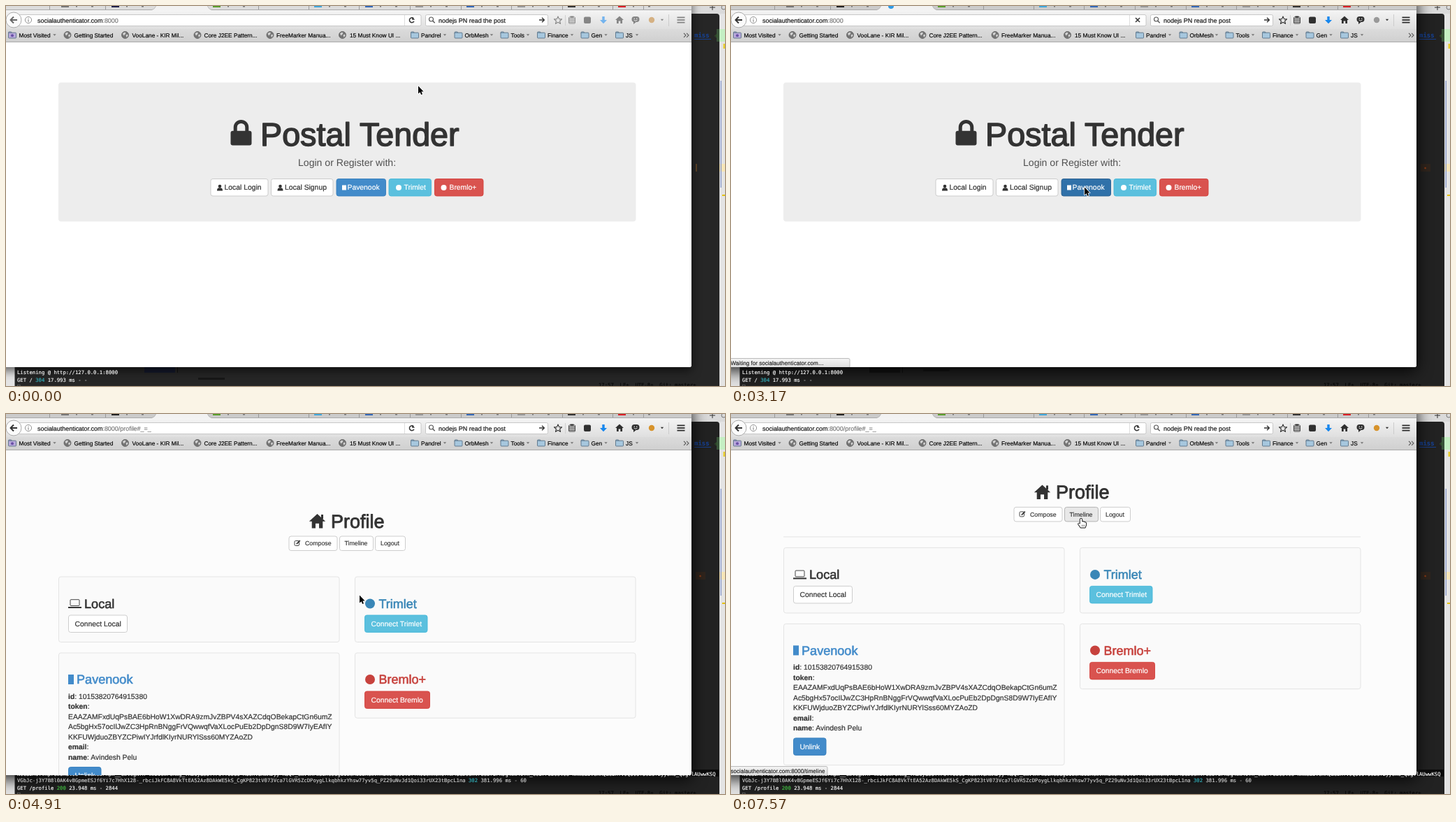
An HTML page with a canvas that plays this animation: 1029x544 px, repeating every 8 s.

```html
<!DOCTYPE html>
<html lang="en">
<head>
<meta charset="utf-8">
<title>Sign-in demo</title>
<style>
  html, body { margin: 0; width: 100%; height: 100%; overflow: hidden; background: #232323; }
  canvas { display: block; width: 100vw; height: 100vh; }
</style>
</head>
<body>
<canvas id="stage"></canvas>
<script>
const W = 1029, H = 544, LOOP = 8000;
const SANS = '"Liberation Sans", Arial, sans-serif';
const MONO = '"DejaVu Sans Mono", monospace';
const INK = '#333', BLUE = '#428bca', SKY = '#5bc0de', RED = '#d9534f';
const SITE = 'socialauthenticator.com';
const canvas = document.getElementById('stage');
const c = canvas.getContext('2d');
const dpr = window.devicePixelRatio || 1;
canvas.width = W * dpr;
canvas.height = H * dpr;
c.textRendering = 'geometricPrecision';
c.lineJoin = 'round';

// Progress 0..1 in n equal jumps; the first jump is at a, the last at b.
function steps(t, a, b, n) {
  if (t < a) return 0;
  return Math.min(1, (Math.floor((t - a) / ((b - a) / (n - 1)) + 1e-6) + 1) / n);
}
const smooth = p => p * p * (3 - 2 * p);
const mix = (a, b, p) => a + (b - a) * p;

function junk(n, seed) {
  const set = 'ABCDEFGHJKLNPQRSTUVWXYZabcdefghkmnpqrstuvwxyz0123456789-_';
  let s = '';
  while (n--) {
    seed = (seed * 16807) % 2147483647;
    s += set[seed % set.length];
  }
  return s;
}

// A thin outline of the same colour gives the text its weight.
function text(s, x, y, size, color = '#000', o = {}) {
  const heavy = o.heavy ?? size * 0.02;
  c.font = `${o.bold ? 'bold ' : ''}${size}px ${o.face || SANS}`;
  c.fillStyle = c.strokeStyle = color;
  c.fillText(s, x, y);
  if (heavy) {
    c.lineWidth = heavy;
    c.strokeText(s, x, y);
  }
  return x + c.measureText(s).width;
}
function runs(x, y, size, parts, o) {
  for (const [s, color, bold] of parts) x = text(s, x, y, size, color, { ...o, bold });
}
function rect(x, y, w, h, fill) {
  c.fillStyle = fill;
  c.fillRect(x, y, w, h);
}
function box(x, y, x2, y2, r, fill, line) {
  c.beginPath();
  c.roundRect(x, y, x2 - x, y2 - y, r);
  if (fill) { c.fillStyle = fill; c.fill(); }
  if (line) { c.strokeStyle = line; c.lineWidth = 0.9; c.stroke(); }
}
function dot(x, y, r, fill, line, w = 1) {
  c.beginPath();
  c.arc(x, y, r, 0, 7);
  if (fill) { c.fillStyle = fill; c.fill(); }
  if (line) { c.strokeStyle = line; c.lineWidth = w; c.stroke(); }
}
function path(d, x, y, fill, line, w = 1, scale = 1) {
  c.save();
  c.translate(x, y);
  c.scale(scale, scale);
  const p = new Path2D(d);
  if (line) { c.strokeStyle = line; c.lineWidth = w; c.stroke(p); }
  if (fill) { c.fillStyle = fill; c.fill(p); }
  c.restore();
}
function vertical(y, y2, a, b) {
  const g = c.createLinearGradient(0, y, 0, y2);
  g.addColorStop(0, a);
  g.addColorStop(1, b);
  return g;
}

const HOME = 'M-6 0L0-5.5L6 0H4V5H1.3V1.5H-1.3V5H-4V0Z';
const DOWN = 'M-2.2-1.2H2.2L0 1.3Z';

function desktop(s) {
  rect(0, 0, W, H, '#e4e4e4');
  rect(981, 0, 48, 11, '#dadada');
  path('M-4 0H4M0-4V4', 1011, 2, null, '#333', 1);
  dot(1027, 2, 3, null, '#777');
  box(12.5, 11, 1021, 560, 4, s.active ? '#222' : '#262626');
  rect(1021, 33, 8, 18, '#c5efc3');
  rect(1017, 33, 4, 18, '#385238');
  text('miss', 985, 45, 9, '#18418f', { face: MONO, bold: true });
  rect(985, 47, 24, 1, '#18418f');
  text('✣', 1014, 45, 8, '#345a2d', { face: MONO });
  rect(987, 226, s.active ? 14 : 2, 11, s.active ? '#30251d' : '#5d4225');
  if (s.active) text('•', 992, 235, 9, '#8a3b16');
  rect(1021, 226, 8, 11, '#f7e6b8');
  rect(1022.5, 107, 1.5, 153, '#8f9fcc');
  rect(1026.5, 54, 2.5, 7, '#e9cd2f');
  rect(1025, 270, 4, 2, '#e6c100');

  text('17:57  LF÷  UTF-8÷  Git: master÷', 848, 545, 7.25, '#070707', { face: MONO });
  rect(275, s.active ? 520 : 532, 38, 3, '#171717');
  rect(198, 516, 44, 9, s.active ? '#151515' : '#151a2c');
  rect(245, 516, 1, 9, '#111');
}

function log(s) {
  const o = { face: MONO }, ink = '#fff', teal = '#35b5c0';
  if (!s.logged) {
    text('Listening @ http://127.0.0.1:8000', 16, 527, 7.25, ink, o);
    runs(16, 538, 7.25, [['GET / ', ink], ['304', teal], [' 17.993 ms - -', ink]], o);
  } else {
    rect(981, 509, 39, 10, '#0a0a0a');
    text(junk(221, 77) + 'lAUwwKSQ', 16, 517.5, 7.25, ink, o);
    runs(16, 527, 7.25, [
      ['VGbJc-j3Y7B8l0AK4vBGpmeESJf6Yi7c7HhX128-_rbciJkFC8A8VkTtEA52Az8DAkWE5kS_' +
       'CgKP823tV073Vca7lGVR5ZcDPoygLlkqbhkzYhsw77yv5q_PZ29uNvJd1Qoi33rUX23tBpcL1na', '#d2d2d2'],
      [' 302', teal], [' 381.996 ms - 60', '#d2d2d2']], o);
    runs(16, 538, 7.25, [['GET /profile ', ink], ['200', '#43c443'], [' 23.948 ms - 2844', ink]], o);
  }
  text('□', 16, 546, 7.25, '#777', o);
}

function frame(s) {
  c.save();
  c.shadowColor = s.active ? 'rgba(0,0,0,.9)' : 'rgba(0,0,0,.6)';
  c.shadowBlur = (s.active ? 22 : 14) * dpr;
  c.shadowOffsetY = 5 * dpr;
  box(-20, -20, 981, 517, 3, '#fff');
  c.restore();
}

function tabs(s) {
  rect(0, 0, 981, 6, s.active ? '#cbcbcb' : '#dcdcdc');
  rect(0, 5, 981, 1, '#aaa');
  path('M208 6Q213 5 215 0H288Q290 5 295 6Z', 0, 0, '#f2f2f2', '#999', 0.7);
  for (const x of [62, 142, 361, 433, 505, 578, 651, 723, 796, 868, 912]) rect(x, 0, 1, 5, '#999');
  const icons = [[84, '#777'], [156, s.active ? '#222' : '#20204a'], [301, '#5a9e2c'], [446, '#42a8dc'],
    [519, '#3569b8'], [591, '#999'], [664, '#3569b8'], [737, '#999'], [809, '#333'], [881, '#d91f26']];
  for (const [x, color] of icons) {
    rect(x - 5, 0, 11, 2, color);
    rect(x + 16, 0, 2, 1.5, '#777');
    rect(x + 38, 0, 3, 1.5, '#777');
  }
  if (s.loading) dot(229, 0, 4, '#2f9be6');
}

function navBar(s) {
  rect(0, 6, 981, 28, vertical(6, 34, '#f4f4f4', '#dedede'));
  rect(0, 33, 981, 18, vertical(33, 51, '#dbdbdb', '#d0d0d0'));
  rect(0, 51, 981, 1, '#a9a9a9');
  const ink = s.active ? '#303030' : '#858585';
  box(14, 12.5, 594, 28.5, 2, '#fff', '#c3c3c3');
  box(600.5, 12.5, 775.5, 28.5, 2, '#fff', '#c3c3c3');
  dot(11, 20, 11, '#fbfbfb', '#aaa');
  path('M5 0H-4M0-4.5L-4.5 0L0 4.5', 11, 20, null, s.active ? '#333' : '#666', 2);
  dot(32, 20, 4.6, null, '#888', 0.9);
  rect(31.5, 19.4, 1, 3.4, '#777');
  rect(31.5, 17.4, 1, 1.1, '#777');
  runs(45, 23.6, 8.95, [[SITE, '#111'], [':8000' + s.route, '#777']]);
  rect(570, 13, 1, 15, '#ddd');
  if (s.loading) path('M-3-3L3 3M3-3L-3 3', 582, 20, null, '#333', 1.5);
  else {
    path('M3 1.6A3.5 3.5 0 1 1 2.4-2.6', 581, 20.3, null, '#333', 1.5);
    path('M0 0V-4.2L4.2 0Z', 581.2, 19.8, '#333', null, 1, 0.95);
  }
  dot(608.5, 19, 3, null, '#555', 1.1);
  path('M0 0L3 3', 610.7, 21.2, null, '#555', 1.4);
  text('nodejs PN read the post', 619, 23.6, 8.95, '#111');
  path('M-4 0H3M0-3.2L3.4 0L0 3.2', 767, 20, null, '#333', 1.4);

  path('M0-5.5L1.6-1.8L5.6-1.5L2.5 1.1L3.5 5L0 2.9L-3.5 5L-2.5 1.1L-5.6-1.5L-1.6-1.8Z', 790, 20.4, null, ink, 1.1);
  rect(800, 13, 1, 15, '#d0d0d0');
  box(805.5, 16, 814.5, 25, 1, null, ink);
  rect(807.5, 14.5, 5, 2.5, ink);
  for (let i = 0; i < 3; i++) rect(806, 18 + i * 2.3, 8, 1, ink);
  box(827, 15.5, 837, 25, 2, ink);
  path('M-1.7-5H1.7V0H5L0 5.3L-5 0H-1.7Z', 855, 20, s.active ? '#1687ee' : '#74b4ee');
  path(HOME, 878, 20, ink);
  box(895.5, 15, 906.5, 23, 4, ink);
  path('M0 0L5 0L0 4Z', 898, 22, ink);
  dot(899.3, 18, 0.8, '#eee');
  dot(902.7, 18, 0.8, '#eee');
  path('M-2.5 0Q0 2.6 2.5 0', 901, 20, null, '#eee', 0.9);
  dot(924, 20, 4.2, s.loading ? '#999' : s.active ? '#d7932c' : '#d5b183');
  path(DOWN, 939, 20, ink);
  rect(948, 12, 1, 17, '#ccc');
  for (let i = 0; i < 3; i++) rect(960.5, 15.5 + i * 3.6, 11, 1.8, ink);
}

function folder(x, fill) {
  box(x - 5.5, 37, x - 1, 40, 1, fill, '#587186');
  box(x - 5.5, 38.2, x + 5.5, 46, 1, fill, '#587186');
}
function bookmarks() {
  const y = 44.8, size = 8.3;
  folder(9, '#b9a9dc');
  dot(9, 42.2, 2, '#6a50a7');
  text('Most Visited', 18.5, y, size);
  path(DOWN, 69.5, 41.5, '#777');
  const pages = [[88, 'Getting Started'], [170.5, 'VooLane - KIR Mil...', 180.5], [274, 'Core J2EE Pattern...'],
    [378, 'FreeMarker Manua...', 387], [481.5, '15 Must Know UI ...', 492]];
  for (const [x, name, at = x + 9.5] of pages) {
    dot(x, 41.5, 5, '#747474', '#606060', 0.8);
    path('M-3.5-2Q-1-5 1-3L0-1L-2 1ZM1 0L3.5-1L4 1L2 3.6Z', x, 41.5, '#d3d3d3');
    text(name, at, y, size);
  }
  const groups = [[585, 'Pandrel', 628], [647.5, 'OrbMesh', 695], [713.5, 'Tools', 747],
    [766, 'Finance', 810], [828.5, 'Gen', 858.5], [878, 'JS', 903]];
  for (const [x, name, arrow] of groups) {
    folder(x, '#a6c7de');
    text(name, x + 9, y, size);
    path(DOWN, arrow, 41.5, '#777');
  }
  path('M0-3L3 0L0 3M4-3L7 0L4 3', 970, 41.8, null, '#555', 1.1);
}

function button(x, x2, y, label, at, o = {}) {
  const size = o.size || 10.36, h = o.size ? 21 : 25;
  box(x + 0.5, y + 0.5, x2 - 0.5, y + h, 3, o.fill || '#fff', o.line || '#c8c8c8');
  text(label, at, y + h / 2 + size * 0.36, size, o.fill && !o.dark ? '#fff' : INK);
}
const blue = { fill: BLUE, line: '#357ebd' };
const sky = { fill: SKY, line: '#46b8da' };
const red = { fill: RED, line: '#d43f3a' };

function person(x, y) {
  dot(x, y - 2, 2.3, INK);
  path('M-4 4.5Q-4.3 0 0 .2Q4.3 0 4 4.5Z', x, y, INK);
}

function loginPage(s) {
  rect(0, 52, 981, 465, '#fff');
  box(75, 109.5, 901.5, 308.5, 4, '#ededed');
  path('M328.2 181V173.7A8.3 8.3 0 0 1 344.8 173.7V181', 0, 0, null, INK, 5);
  box(321.5, 178.7, 351.5, 199.5, 3, INK);
  text('Postal Tender', 364, 199.5, 46.7, INK, { heavy: 1.5 });
  text('Login or Register with:', 418, 229, 14.08, '#505050', { heavy: 0 });
  button(292.5, 375.5, 247, 'Local Login', 312.5);
  button(379, 468.5, 247, 'Local Signup', 399);
  person(306, 260);
  person(392.5, 260);
  button(472.5, 544, 247, 'Pavenook', 488.5, s.hover ? { fill: '#3071a9', line: '#285e8e' } : blue);
  button(547.5, 609, 247, 'Trimlet', 569.5, sky);
  button(613, 683.5, 247, 'Bremlo+', 634.5, red);
  rect(481, 256.5, 6, 7, '#fff');
  dot(562, 260, 4, '#fff');
  dot(626.5, 260, 4, '#fff');
}

function profilePage(s) {
  rect(0, 52, 981, 465, '#fcfcfc');
  c.save();
  c.beginPath();
  c.rect(0, 52, 981, 465);
  c.clip();
  c.translate(0, -s.scroll);
  if (s.scroll) rect(75, 217, 826, 1, '#e4e4e4');

  path(HOME, 445.5, 153.8, INK, null, 1, 1.95);
  rect(451, 144, 3, 6, INK);
  text('Profile', 465, 162.8, 27, INK, { heavy: 0.9 });
  const small = { size: 8.8 };
  button(404.5, 474.5, 174.5, 'Compose', 428, small);
  button(477, 526, 174.5, 'Timeline', 484.5,
    s.timeline ? { size: 8.8, fill: '#e8e8e8', line: '#adadad', dark: true } : small);
  button(528, 572, 174.5, 'Logout', 536, small);
  box(413, 181.5, 419.5, 188.5, 1.5, null, INK);
  path('M0 0L5-5', 415.8, 186.2, null, INK, 1.7);

  const well = (x, y, y2) => box(x + 0.5, y + 0.5, x + 402, y2, 3, '#fafafa', '#e1e1e1');
  well(75, 232.5, 326.5);
  well(499, 232.5, 326.5);
  well(75, 341.5, 544.2);
  well(499, 341.5, 435.2);

  const title = { heavy: 0.6 };
  box(92, 265.7, 105, 274.5, 1, null, INK);
  rect(89, 276, 19, 2, INK);
  text('Local', 112, 277.6, 18.1, INK, title);
  button(89, 174, 287.5, 'Connect Local', 98.5);

  dot(521, 271.5, 7, '#3a87b7');
  text('Trimlet', 533.5, 277.6, 18, '#3a87b7', title);
  button(513, 603.5, 287.5, 'Connect Trimlet', 522.5, sky);

  dot(521, 380, 7, '#c7423d');
  text('Bremlo+', 533.5, 386.3, 18, '#c7423d', title);
  button(513, 607, 396.5, 'Connect Bremlo', 522.5, red);

  rect(89, 373, 8, 14, BLUE);
  text('Pavenook', 101, 386.3, 18.1, BLUE, title);
  const rows = [
    [['id', INK, true], [': 10153820764915380', INK]],
    [['token', INK, true], [':', INK]],
    [['EAAZAMFxdUqPsBAE6bHoW1XwDRA9zmJvZBPV4sXAZCdqOBekapCtGn6umZ', INK]],
    [['Ac5bgHx57ocIlJwZC3HpRnBNggFrVQwwqfVaXLocPuEb2DpDgnS8D9W7IyEAfIY', INK]],
    [['KKFUWjduoZBYZCPiwIYJrfdlKIyrNURYlSss60MYZAoZD', INK]],
    [['email', INK, true], [':', INK]],
    [['name', INK, true], [': Avindesh Pelu', INK]]
  ];
  rows.forEach((row, i) => runs(89, 407.6 + i * 14.5, 10.36, row));
  button(89, 136.5, 505, 'Unlink', 98.5, blue);
  c.restore();

  if (s.bar) {
    c.globalAlpha = s.bar;
    const y = 53 + s.scroll * 0.97;
    box(974.5, y, 980, y + 422, 3, '#7d7d7d');
    c.globalAlpha = 1;
  }
}

function status(s) {
  if (!s.status) return;
  const [label, w] = s.status;
  box(-4, 504.5, w, 520, 2, vertical(504, 517, '#f5f5f5', '#dedede'), '#b5b5b5');
  text(label, -0.5, 514, 8.1, '#222');
}

function pointer(s) {
  const [x, y] = s.at;
  if (s.hand) {
    path('M-1.3 6.5V.7Q0-1 1.3.7V4.2Q2.8 3.4 3.4 4.6Q5 4 5.4 5.3Q7 5 7.1 6.6V9.2L5.8 12.5H-.6L-4 7.6Q-3.6 5.6-1.3 7.6Z',
      x, y, '#fff', '#111', 1.8);
    path('M1.4 8.6V11M3.2 8.6V11M5 8.6V11', x, y, null, '#333', 0.6);
  } else {
    path('M0 0V11L2.5 8.7L4.2 12.6L6 11.8L4.4 8H7.6Z', x, y, '#000', '#fff', 1.6);
  }
}

function stateAt(t) {
  const enter = smooth(steps(t, 750, 1420, 5));
  const rise = steps(t, 6290, 6940, 5);
  const profile = t >= 4100;
  const timeline = rise > 0.9;
  const clicked = t >= 1925 && t < 2580;
  let at = [mix(590, 507.2, enter), mix(114.5, 254, enter)];
  if (t >= 1925) at = [507.5, 258.3];
  if (t >= 2430) at = [506.5, 259];
  if (t >= 2580) at = [mix(506, 501, smooth(rise)), mix(259.5, 150, smooth(rise))];
  const loading = t >= 3170 && !profile;
  let note = null;
  if (t >= 2130) note = [SITE + ':8000/auth/pavenook', 162];
  if (loading) note = ['Waiting for ' + SITE + '…', 170];
  if (profile) note = timeline ? [SITE + ':8000/timeline', 138] : null;
  return {
    at, profile, loading, timeline,
    hand: clicked || timeline,
    active: t >= 1720,
    hover: t >= 1925,
    logged: t >= 3790,
    route: t >= 3790 ? '/profile#_=_' : '',
    status: note,
    scroll: 41.6 * steps(t, 5510, 5660, 2),
    bar: !profile || t >= 7570 ? 0 : t < 4640 ? 1 : t < 4910 ? 0.5 : t < 5510 ? 0 : 1
  };
}

function draw(now) {
  const s = stateAt(now % LOOP);
  c.setTransform(dpr, 0, 0, dpr, 0, 0);
  desktop(s);
  frame(s);
  log(s);
  c.save();
  c.beginPath();
  c.roundRect(-20, -20, 1001, 537, 3);
  c.clip();
  (s.profile ? profilePage : loginPage)(s);
  tabs(s);
  navBar(s);
  bookmarks();
  status(s);
  c.restore();
  pointer(s);
}

const start = performance.now();
function tick() {
  draw(performance.now() - start);
  requestAnimationFrame(tick);
}
tick();
</script>
</body>
</html>
```
